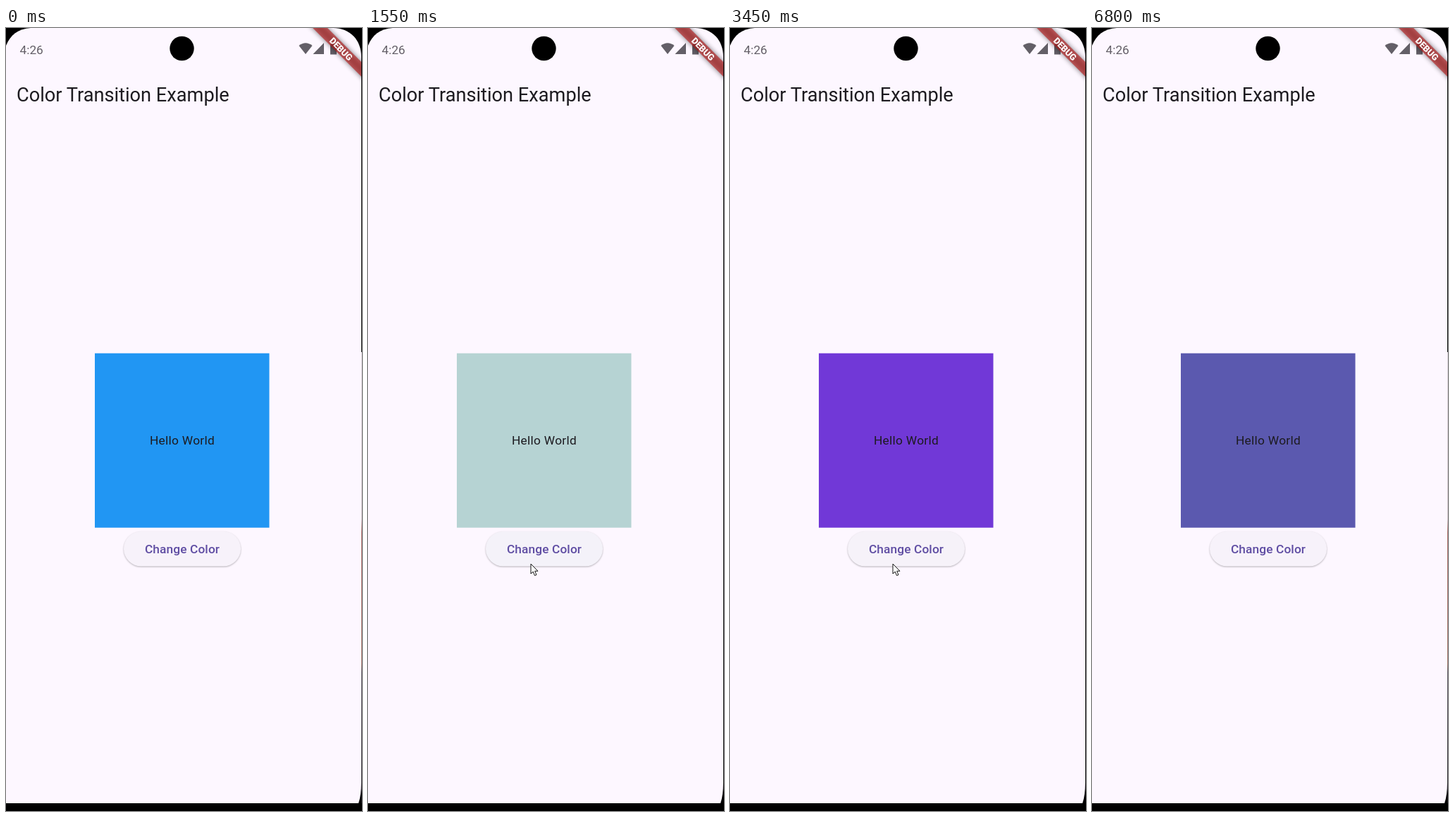
Recreate the animation shown at these times as an HTML page. Size 505 by 1109 pixels, loop 6880 ms.

```html
<!DOCTYPE html>
<html lang="en">
<head>
<meta charset="utf-8">
<title>Color Transition Example</title>
<style>
  html, body { margin: 0; width: 100%; height: 100%; overflow: hidden; background: #000; }
  svg { display: block; width: 505px; height: 1109px; font-family: Roboto, sans-serif; }
  .box, .button, .cursor, .press, .edge { animation: 6880ms linear infinite; }
  .box { animation-name: box; }
  .button { animation-name: button; filter: drop-shadow(0 1.2px 1.1px rgba(0, 0, 0, .28)); }
  .cursor { animation-name: cursor; }
  .press { animation-name: press; animation-timing-function: step-end; }
  .edge { animation-name: edge; animation-timing-function: step-end; }
  .body { font-size: 17.3px; fill: #1d1b20; }
  .title { font-size: 27.2px; fill: #1d1b20; }
  .label { font-weight: 500; fill: #5f4da3; letter-spacing: .12px; }
  .banner { font-size: 12.6px; font-weight: 900; fill: #fff; }

  @keyframes box {
    0%, 13.81% { fill: #2196f3; }
    18.17% { fill: #6cb0cf; }
    22.53%, 24.6% { fill: #b6d3d3; }
    27.76%, 45.2% { fill: #fdf7ff; }
    48.11% { fill: #926ce0; }
    51.16%, 67.59% { fill: #611fd2; }
    77.62%, 100% { fill: #5b59af; }
  }
  @keyframes button {
    0%, 11.48% { fill: #f7f2fa; }
    15.3%, 18.9% { fill: #ede8f2; }
    22.53%, 24.6% { fill: #f4f2f9; }
    25.5%, 35.4% { fill: #f5f1f8; }
    39% { fill: #f2eef6; }
    45.2%, 58.1% { fill: #f6f2f9; }
    62%, 64.1% { fill: #efebf6; }
    68%, 76% { fill: #f5f1f8; }
    79%, 100% { fill: #f7f2fa; }
  }
  @keyframes cursor {
    0%, 1.5% { transform: translate(510px, 1003px); }
    4.9% { transform: translate(355px, 906px); }
    8.4% { transform: translate(252px, 790px); }
    10.6%, 74.5% { transform: translate(231px, 759px); }
    77.6% { transform: translate(248px, 764px); }
    78.92%, 80.96% { transform: translate(250px, 749px); }
    90.7%, 100% { transform: translate(510px, 1003px); }
  }
  @keyframes press {
    0% { opacity: 0; }
    11.48% { opacity: 1; }
    13.81% { opacity: 0; }
    35.46% { opacity: 1; }
    38.4% { opacity: 0; }
    58.13% { opacity: 1; }
    61% { opacity: 0; }
  }
  @keyframes edge {
    0% { opacity: 1; }
    1.02% { opacity: 0; }
    96.8% { opacity: 1; }
  }
</style>
</head>
<body>
<svg viewBox="0 0 505 1109">
  <defs>
    <linearGradient id="edgeTone" x1="0" y1="0" x2="0" y2="1">
      <stop offset="0" stop-color="#d8d0d9"/>
      <stop offset=".37" stop-color="#c9bcc4"/>
      <stop offset=".4" stop-color="#a5625f"/>
      <stop offset=".69" stop-color="#9a6b60"/>
      <stop offset=".71" stop-color="#56505c"/>
      <stop offset="1" stop-color="#151318"/>
    </linearGradient>
    <filter id="soft" x="-20%" y="-100%" width="140%" height="300%">
      <feGaussianBlur stdDeviation="3.6"/>
    </filter>
    <clipPath id="screen">
      <path id="outline" d="M0 25C6 10 17 1 35 0H464C488 0 504 17 504 41V1068Q504 1087 500 1098H0Z"/>
    </clipPath>
  </defs>

  <rect width="505" height="1109"/>
  <use href="#outline" fill="#fdf7ff"/>
  <rect class="edge" x="504" y="459" width="1" height="639" fill="url(#edgeTone)"/>

  <g fill="#635f67">
    <text x="19.5" y="36.5" font-size="17.3">4:26</text>
    <path d="M415.5 25Q425 17.5 434.500 25L425 37Z"/>
    <path d="M451 21V37H435.500Z"/>
    <path d="M460 23H462.500V21H466.500V23H469V37.500H460Z"/>
  </g>
  <circle cx="249.5" cy="29" r="17.2"/>
  <text class="title" x="15" y="104">Color Transition Example</text>

  <rect class="box" x="126" y="460.700" width="247.500" height="247"/>
  <text class="body" x="250" y="590" text-anchor="middle" letter-spacing=".31">Hello World</text>

  <rect class="button" x="167" y="713" width="166" height="49.300" rx="24.650"/>
  <text class="body label" x="250" y="744" text-anchor="middle">Change Color</text>

  <g clip-path="url(#screen)">
    <g transform="translate(505 0) rotate(45)">
      <rect x="-60" y="34.600" width="120" height="14.800" fill="#000" opacity=".5" filter="url(#soft)"/>
      <rect x="-60" y="34.600" width="120" height="14.800" fill="#b71c1c" opacity=".63"/>
      <text class="banner" x="0" y="46.500" text-anchor="middle">DEBUG</text>
    </g>
  </g>

  <g class="cursor">
    <path d="M0 0V14L3.200 11L5.500 16.500L8 15.500L5.700 10.200H10Z" fill="#fff" stroke="#111" stroke-width="1"/>
  </g>
  <circle class="press" cx="230.500" cy="758.500" r="11" fill="#fffa40" fill-opacity=".75"/>
</svg>
</body>
</html>
```
